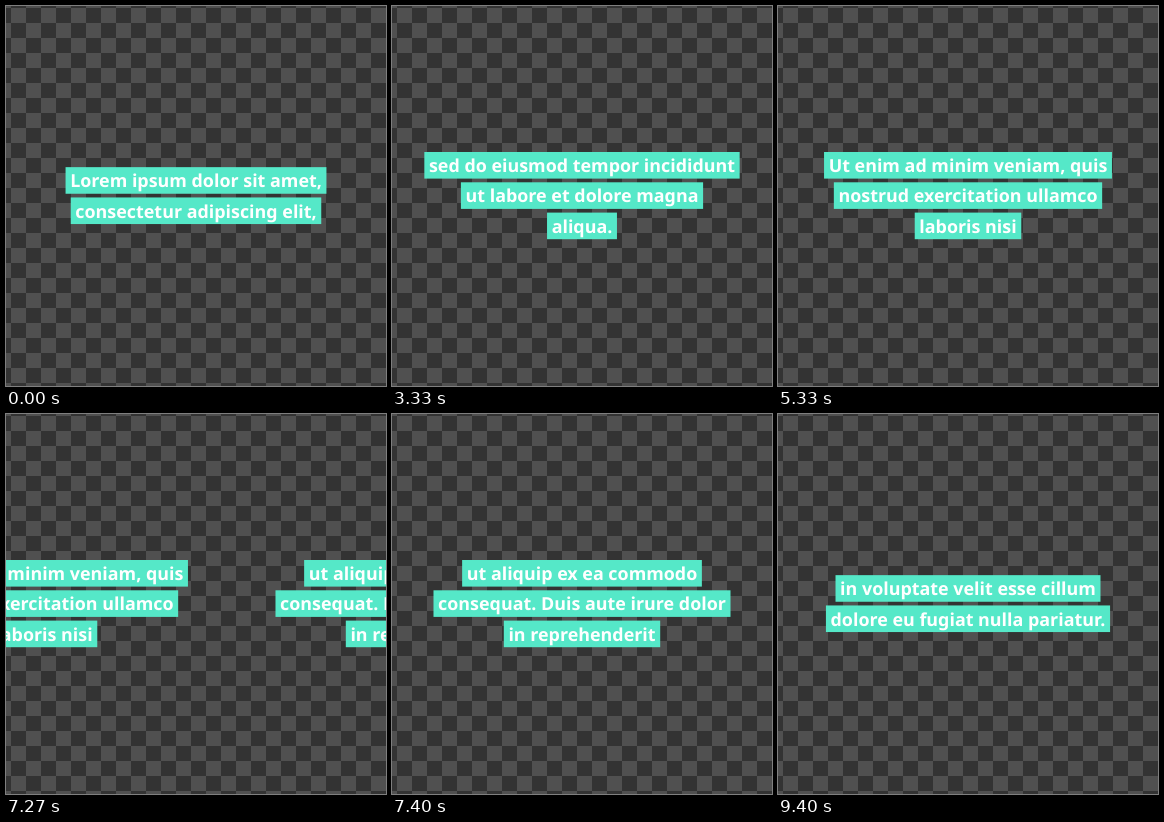
Animation of 380 by 380 pixels, one loop 9790 ms. Source, as an HTML page:

```html
<!DOCTYPE html>
<html lang="la">
<head>
<meta charset="utf-8">
<title>Sliding captions</title>
<style>
  html, body { margin: 0; width: 100%; height: 100%; overflow: hidden; background: #333; }
  svg { display: block; width: 100vw; height: 100vh; }
  text {
    font: 700 17.9px "Noto Sans", "Open Sans", sans-serif;
    fill: #fff;
    text-anchor: middle;
    text-rendering: geometricPrecision;
  }
</style>
</head>
<body>
<svg id="stage" viewBox="0 0 380 380">
  <defs>
    <pattern id="checks" x="5" y="2" width="30" height="30" patternUnits="userSpaceOnUse">
      <rect width="30" height="30" fill="#333"/>
      <path d="M0 0h15v15h-15zM15 15h15v15h-15z" fill="#505050"/>
    </pattern>
  </defs>
  <rect width="380" height="380" fill="url(#checks)" shape-rendering="crispEdges"/>
</svg>
<script>
const SIZE = 380, LOOP = 9790, FRAME = 200 / 3;
const MID_Y = 189.6, PITCH = 30.3, BOX_H = 26.6, PAD = 4.6;
const FIRST = 47, GAP = 30.5, SPEED = 0.4; // slide timing, in frames

const captions = [
  ["Lorem ipsum dolor sit amet,", "consectetur adipiscing elit,"],
  ["sed do eiusmod tempor incididunt", "ut labore et dolore magna", "aliqua."],
  ["Ut enim ad minim veniam, quis", "nostrud exercitation ullamco", "laboris nisi"],
  ["ut aliquip ex ea commodo", "consequat. Duis aute irure dolor", "in reprehenderit"],
  ["in voluptate velit esse cillum", "dolore eu fugiat nulla pariatur."]
];

const stage = document.getElementById("stage");

function add(parent, tag, attrs) {
  const el = document.createElementNS("http://www.w3.org/2000/svg", tag);
  for (const key in attrs) el.setAttribute(key, attrs[key]);
  return parent.appendChild(el);
}

function addLine(group, line, y) {
  const box = add(group, "rect", { y: y - BOX_H / 2, height: BOX_H, fill: "#55e8c8" });
  const text = add(group, "text", { x: SIZE / 2, y: y + 6.8 });
  text.textContent = line;
  const w = text.getComputedTextLength() + 2 * PAD;
  box.setAttribute("x", (SIZE - w) / 2);
  box.setAttribute("width", w);
}

const groups = captions.map(lines => {
  const group = add(stage, "g", {});
  lines.forEach((line, i) => addLine(group, line, MID_Y + (i - (lines.length - 1) / 2) * PITCH));
  return group;
});

const clamp = v => Math.min(1, Math.max(0, v));

// Number of captions passed so far, fractional during a slide
function position(ms) {
  const n = Math.floor((Math.floor(ms / 10) * 10 + 4) / FRAME);
  let pos = 0;
  for (let k = 0; k < captions.length - 1; k++) pos += clamp((n - FIRST - GAP * k) * SPEED);
  return pos;
}

function draw(ms) {
  const pos = position(ms % LOOP);
  groups.forEach((group, i) => {
    const off = i - pos;
    group.setAttribute("transform", `translate(${off * SIZE} 0)`);
    group.setAttribute("visibility", Math.abs(off) < 1 ? "visible" : "hidden");
  });
}

const start = performance.now();
function tick() {
  draw(performance.now() - start);
  requestAnimationFrame(tick);
}
tick();
</script>
</body>
</html>
```
